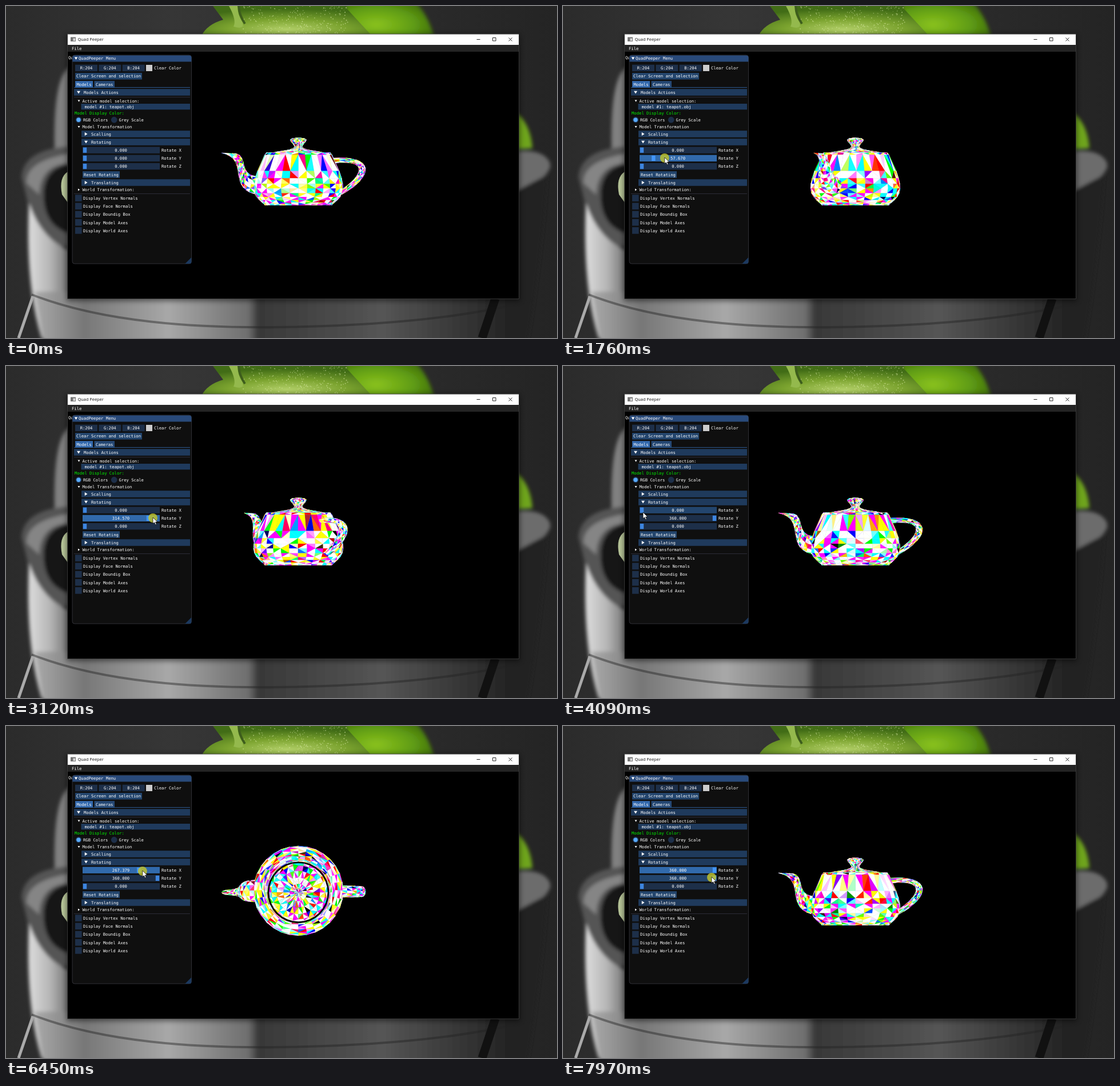
An HTML page with a canvas for the animation above (7.99 s loop, 964 by 581 pixels).

```html
<!DOCTYPE html>
<html lang="en">
<head>
<meta charset="utf-8">
<title>Quad Peeper</title>
<style>
html, body { margin: 0; width: 100%; height: 100%; overflow: hidden; background: #222; }
svg, canvas { position: absolute; left: 0; top: 0; width: 964px; height: 581px; display: block; }
.ui { font: 7.22px "DejaVu Sans Mono", monospace; fill: #fff; white-space: pre; }
</style>
</head>
<body>
<svg viewBox="0 0 964 581">
  <defs>
    <linearGradient id="wall"><stop stop-color="#2b2b2b"/><stop offset=".3" stop-color="#363636"/><stop offset="1" stop-color="#242424"/></linearGradient>
    <linearGradient id="wood"><stop stop-color="#aaa"/><stop offset=".1" stop-color="#777"/><stop offset=".27" stop-color="#a8a8a8"/><stop offset=".43" stop-color="#6e6e6e"/><stop offset=".45" stop-color="#383838"/><stop offset=".7" stop-color="#555"/><stop offset="1" stop-color="#1a1a1a"/></linearGradient>
    <linearGradient id="stave"><stop stop-color="#ddd"/><stop offset=".5" stop-color="#b5b5b5"/><stop offset="1" stop-color="#666"/></linearGradient>
    <radialGradient id="apple" cx=".5" cy=".8" r=".7"><stop stop-color="#b3d069"/><stop offset=".5" stop-color="#7ba32f"/><stop offset="1" stop-color="#416c16"/></radialGradient>
    <radialGradient id="side" cx=".35" cy=".6" r=".7"><stop stop-color="#8ac21f"/><stop offset=".6" stop-color="#5f9c12"/><stop offset="1" stop-color="#3d6a10"/></radialGradient>
    <filter id="soft" x="-20%" y="-20%" width="140%" height="140%"><feGaussianBlur stdDeviation="3"/></filter>
    <filter id="shade" x="-5%" y="-5%" width="110%" height="112%"><feGaussianBlur stdDeviation="5"/></filter>
  </defs>
  <rect width="964" height="581" fill="url(#wall)"/>
  <g filter="url(#soft)">
    <path d="M85 250Q82 115 116 105V270Z" fill="#808080"/>
    <path d="M27 300Q30 250 116 245V420H52Q40 345 27 300Z" fill="#555"/>
    <path d="M36 310Q34 270 116 258V275Q60 275 58 330Z" fill="#858585"/>
    <path d="M116 275Q64 282 66 335T116 400Z" fill="#151515"/>
    <path d="M40 345Q62 410 116 430V581H62Q34 490 40 345Z" fill="url(#stave)"/>
    <path d="M50 500H920L905 590H66Z" fill="url(#wood)"/>
    <path d="M890 270Q935 255 948 272Q940 420 912 590H890Z" fill="#222"/>
    <path d="M890 255Q930 250 946 266T938 300L890 325Z" fill="#6c6c6c"/>
    <path d="M890 185Q918 205 921 249L890 251Z" fill="#6ea41c"/>
    <path d="M592 -9H715Q742 20 750 60H600Z" fill="url(#side)"/>
  </g>
  <path d="M108 290Q92 300 98 330L108 344Z" fill="#b9c79a"/>
  <path d="M45 505Q200 566 480 562T920 515" fill="none" stroke="#222" stroke-width="4" opacity=".45"/>
  <path d="M22 581L47 508" stroke="#aaa" stroke-width="5"/>
  <path d="M833 581L856 512" stroke="#111" stroke-width="15"/>
  <path d="M362 0H592L640 52H342Q352 32 380 24Z" fill="url(#apple)"/>
  <g id="specks" fill="#dcecaa" opacity=".6"/>
  <path d="M390 0Q404 25 398 36Q418 42 414 29Q404 13 406 0Z" fill="#94b94d"/>
  <path d="M407 0Q408 16 418 31" fill="none" stroke="#3d5d1c" stroke-width="4"/>
  <rect x="106" y="50" width="793" height="466" opacity=".5" filter="url(#shade)"/>
  <g id="ui" class="ui"></g>
</svg>
<canvas id="view" width="964" height="581"></canvas>
<svg viewBox="0 0 964 581">
  <g id="mouse">
    <circle id="press" cy="1" r="8" fill="#c5c728" opacity=".8"/>
    <path d="M0 0V11L2.6 8.7 4.4 12.7 6.3 11.9 4.5 8H8Z" fill="#fff" stroke="#000" stroke-width=".7"/>
  </g>
</svg>
<script>
const NAME = 'Quad Peeper', LOOP = 7990, TAU = Math.PI * 2;
const FRAME = '#1d2f49', HOVER = '#23456d', ACTIVE = '#316aac', HEAD = '#1f3a5c', GRAB = '#3d85e0', BRIGHT = '#4296fa';
const $ = id => document.getElementById(id);

function random(seed) {
  return () => {
    seed = seed + 0x6D2B79F5 | 0;
    let x = Math.imul(seed ^ seed >>> 15, 1 | seed);
    x = x + Math.imul(x ^ x >>> 7, 61 | x) ^ x;
    return ((x ^ x >>> 14) >>> 0) / 4294967296;
  };
}

// --- interface
const mid = 'text-anchor="middle"';
const box = (x, y, w, h, fill, more = '') => `<rect x="${x}" y="${y}" width="${w}" height="${h}" fill="${fill}" ${more}/>`;
const dot = (x, r, fill) => `<circle cx="${x}" cy="199.2" r="${r}" fill="${fill}"/>`;
const label = (x, y, s, more = '') => `<text x="${x}" y="${y + 2.6}" ${more}>${s}</text>`;
const arrow = (x, y, open, r = 3) => `<path d="${open
  ? `M${x - r} ${y - r * .75}h${2 * r}l${-r} ${r * 1.6}z`
  : `M${x - r * .75} ${y - r}v${2 * r}l${r * 1.6} ${-r}z`}"/>`;
const header = (x, y, s, open) => box(x, y - 5.8, 322 - x, 11.6, HEAD) + arrow(x + 8, y, open) + label(x + 17, y, s);
const node = (y, s, open) => arrow(127.5, y, open, 2) + label(133.5, y, s);
const button = (x, y, w, s, fill = HOVER) => box(x, y - 5.8, w, 11.6, fill) + label(x + w / 2, y, s, mid);
const line = (y, color) => box(119, y, 203, .8, color);
const rowY = i => 252.2 + 14.2 * i;
const sliderRow = (n, i) => box(134, rowY(i) - 5.7, 135, 11.4, FRAME, `id="bar${n}"`) +
  box(134.8, rowY(i) - 4.6, 6.4, 9.2, GRAB, `id="grab${n}"`) +
  label(201, rowY(i), '0.000', `id="val${n}" ${mid}`) + label(272, rowY(i), 'Rotate ' + n);
const checkRow = (s, i) => box(121, 330.3 + i * 14.2, 11.6, 11.6, FRAME) + label(135, 336.3 + i * 14.2, 'Display ' + s);

$('ui').innerHTML = [
  box(107.5, 49, 790, 463.5, '#000', 'stroke="#555" stroke-width=".6"'),
  box(108, 49.5, 789, 18.5, '#fff'), box(108, 68, 789, 12, '#242424'),
  box(113, 54.5, 9, 7.5, '#777'), box(117.5, 56.5, 3.5, 4.5, '#ddd'),
  `<text x="125.5" y="61" fill="#111" style="font:7.4px 'Open Sans',sans-serif">${NAME}</text>`,
  '<path d="M823.5 58.5h6M851.5 55.5h5.5v5.5h-5.5zM879.5 55.5l6 6m0-6l-6 6" fill="none" stroke="#111" stroke-width=".9"/>',
  label(115, 74, 'File'), label(109, 90, NAME.slice(0, 2)),
  box(116, 86, 208.5, 365, '#0f0f0f', 'rx="4" stroke="#3a3a42" stroke-width=".8"'),
  '<path d="M116.4 97.5V90q0-3.6 4-3.6h200q4 0 4 3.6v7.5z" fill="#294a7a"/>',
  arrow(122.5, 91.6, true, 2.8), label(127, 91.8, NAME.replace(' ', '') + ' Menu'),
  ...[...'RGB'].map((c, i) => button(121 + 41.3 * i, 108.5, 39, c + ':204', FRAME)),
  box(245, 103, 11, 11, '#ccc'), label(259, 108.5, 'Clear Color'),
  button(121, 122.8, 117, 'Clear Screen and selection'),
  button(121, 137, 31, 'Models', '#3369ad'), button(154.5, 137, 35.5, 'Cameras', '#254874'), line(142, '#3369ad'),
  header(119, 151, 'Models Actions', true), line(159, '#333340'),
  node(166, 'Active model selection:', true),
  box(131.5, 171, 190.5, 10.3, HEAD), label(137.5, 176.3, 'model #1: teapot.obj'),
  label(120, 187, 'Model Display Color:', 'fill="#00f000"'),
  dot(127, 5.4, FRAME), dot(127, 3.7, '#58abff'), label(135, 199.2, 'RGB Colors'),
  dot(189.2, 5.4, FRAME), label(197.5, 199.2, 'Grey Scale'),
  node(211.5, 'Model Transformation', true),
  header(132, 224, 'Scalling', false), header(132, 238, 'Rotating', true),
  ...[...'XYZ'].map(sliderRow),
  button(134, 295, 65, 'Reset Rotating'), header(132, 309, 'Translating', false),
  node(321.5, 'World Transformation:', false), line(328, '#333340'),
  ...['Vertex Normals', 'Face Normals', 'Boundig Box', 'Model Axes', 'World Axes'].map(checkRow),
  '<path d="M324.3 440v8q0 3-3 3h-8z" fill="#1c395f"/>'
].join('');

const rnd = random(7);
$('specks').innerHTML = Array.from({ length: 260 }, () =>
  `<circle cx="${415 + rnd() * 185}" cy="${rnd() * 49}" r="${.4 + rnd() * .6}"/>`).join('');

// --- teapot mesh, built from a few Bezier curves
const mesh = [];

function grid(point, nu, nv) {
  for (let i = 0; i < nu; i++) for (let j = 0; j < nv; j++) {
    const a = point(i, j), b = point(i + 1, j), c = point(i, j + 1), d = point(i + 1, j + 1);
    (i + j) % 2 ? mesh.push([a, b, c], [b, c, d]) : mesh.push([a, b, d], [a, d, c]);
  }
}

const bezier = (p, t) => p[0].map((_, k) => {
  const s = 1 - t;
  return s * s * s * p[0][k] + 3 * s * s * t * p[1][k] + 3 * s * t * t * p[2][k] + t * t * t * p[3][k];
});

// points are radius, height; bend < 1 makes the first rows taller
function lathe(points, rows, bend = 1, cols = 32) {
  grid((i, j) => {
    const [r, h] = bezier(points, (i / rows) ** bend), a = j / cols * TAU;
    return [r * Math.cos(a), h - 1.65, r * Math.sin(a)];
  }, rows, cols);
}

// points are inner x, inner height, outer x, outer height, half width
function tube(points, rows = 16, cols = 12) {
  grid((i, j) => {
    const [xi, hi, xo, ho, w] = bezier(points, i / rows), a = j / cols * TAU, k = (1 - Math.cos(a)) / 2;
    return [xi + (xo - xi) * k, hi + (ho - hi) * k - 1.65, .75 * w * Math.sin(a)];
  }, rows, cols);
}

lathe([[0, 3.15], [.8, 3.15], [0, 2.85], [.2, 2.7]], 6);
lathe([[.2, 2.7], [.4, 2.55], [1.3, 2.55], [1.3, 2.4]], 5);
lathe([[1.4, 2.4], [1.34, 2.53], [1.44, 2.53], [1.5, 2.4]], 3);
lathe([[1.5, 2.4], [1.75, 1.875], [2, 1.35], [2, .9]], 4, .55);
lathe([[2, .9], [2, .45], [1.5, .225], [1.5, .15]], 6);
tube([[-1.7, 1.425, -1.7, .6, .66], [-2.75, 1.425, -3.3, .8, .66], [-2.2, 2.35, -2.1, 2.2, .2], [-2.8, 2.45, -3.43, 2.48, .15]]);
tube([[1.6, 2.025, 1.5, 2.25, .3], [3, 2.2, 3.4, 2.4, .3], [3, 1.6, 3.45, 1.45, .3], [2, .9, 1.9, .6, .3]]);

const ctx = $('view').getContext('2d');
ctx.lineWidth = .3;

function drawMesh(ax, ay, seed) {
  const rad = Math.PI / 180, cx = Math.cos(ax * rad), sx = Math.sin(ax * rad), cy = Math.cos(ay * rad), sy = Math.sin(ay * rad);
  const rand = random(seed * 7919);
  const channel = () => { const r = rand(); return r < .66 ? 255 : r < .82 ? 0 : rand() * 255 | 0; };
  const turn = ([x, y, z]) => {
    const u = x * cy + z * sy, w = z * cy - x * sy;
    return [511.5 + 39.2 * u, 289.7 - 39.2 * (y * cx - w * sx), y * sx + w * cx];
  };
  const faces = mesh.map(tri => {
    const p = tri.map(turn);
    return { p, depth: p[0][2] + p[1][2] + p[2][2], color: `rgb(${channel()},${channel()},${channel()})` };
  }).sort((a, b) => a.depth - b.depth);
  ctx.clearRect(330, 150, 350, 280);
  for (const { p, color } of faces) {
    ctx.fillStyle = ctx.strokeStyle = color;
    ctx.beginPath();
    for (const [x, y] of p) ctx.lineTo(x, y);
    ctx.closePath();
    ctx.fill();
    ctx.stroke();
  }
}

// --- motion
const clamp = v => Math.min(1, Math.max(0, v));
const ramp = (t, from, to) => clamp((t - from) / (to - from));
const ease = p => p * p * (3 - 2 * p);
const mix = (a, b, p) => a + (b - a) * p;

const angleY = t => 360 * ramp(t, 1454.7, 3360.5);
const keysX = [[4270, 0], [5250, 150.291], [6110, 255], [6450, 267.379], [7700, 360]];
function angleX(t) {
  const i = keysX.findIndex(k => k[0] > t);
  if (i < 1) return i ? 360 : 0;
  const [t0, a] = keysX[i - 1], [t1, b] = keysX[i];
  return mix(a, b, ramp(t, t0, t1));
}

// while dragging, the pointer runs a little ahead of the grab
const dragPoint = (angle, lead, y) => {
  const p = angle / 360;
  return [138 + 127 * p + Math.min(1, p * 20) * (6 + lead * (1 - p)), y];
};
const glide = (a, b, p) => a.map((v, k) => mix(v, b[k], ease(p)));

function pointer(t) {
  const startY = dragPoint(0, 0, 264), endY = dragPoint(360, 0, 265), startX = [140, 256], endX = dragPoint(360, 0, 253);
  if (t < 1455) return glide([686, 581], startY, ramp(t, 200, 1300));
  if (t < 3480) return dragPoint(angleY(t), 16, 265);
  if (t < 4270) return glide(endY, startX, ramp(t, 3480, 4040));
  if (t < 7700) return dragPoint(angleX(t), 2, 253);
  return glide(endX, [260, 264], ramp(t, 7700, 7960));
}

function slider(name, value, active, hover) {
  const bar = $('bar' + name), grab = $('grab' + name);
  bar.setAttribute('fill', active ? ACTIVE : hover ? HOVER : FRAME);
  grab.setAttribute('x', 134.8 + value / 360 * 127);
  grab.setAttribute('fill', active ? BRIGHT : GRAB);
  $('val' + name).textContent = value.toFixed(3);
}

function render(now) {
  const t = Math.floor(now % LOOP / 10) * 10;
  const ax = angleX(t), ay = angleY(t), [x, y] = pointer(t);
  const dragY = t >= 1455 && t < 3480, dragX = t >= 4270;
  const over = row => t >= 200 && x > 134 && x < 269 && Math.abs(y - rowY(row)) < 5.7;
  slider('X', ax, dragX, !dragY && over(0));
  slider('Y', ay, dragY, over(1));
  $('mouse').setAttribute('transform', `translate(${x} ${y})`);
  $('mouse').style.display = t < 200 ? 'none' : '';
  $('press').style.display = dragX || dragY ? '' : 'none';
  drawMesh(ax, ay, Math.floor(t / 20) + 1);
}

const start = performance.now();
function frame() {
  render(performance.now() - start);
  requestAnimationFrame(frame);
}
frame();
</script>
</body>
</html>
```
